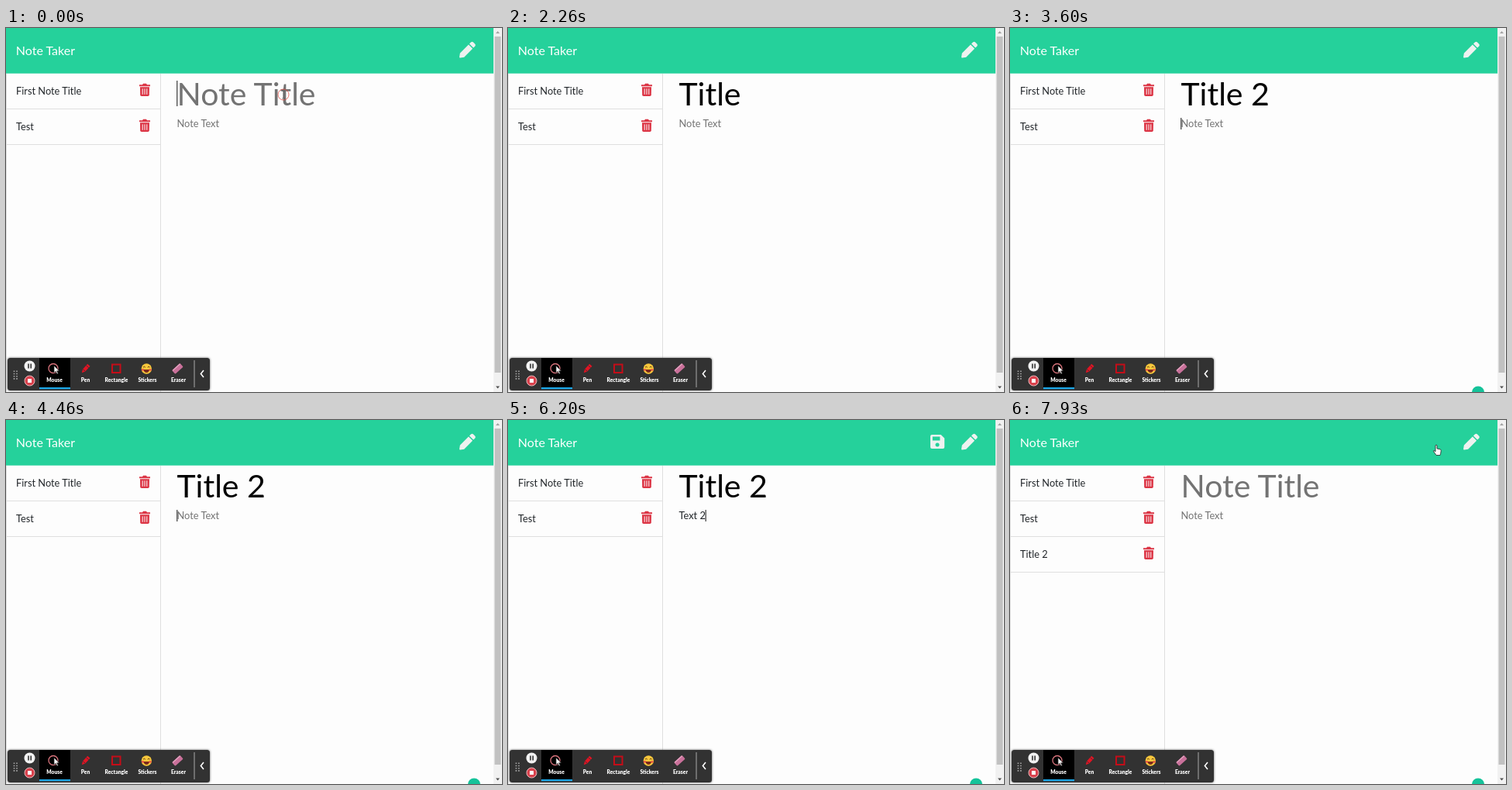
These frames come from a looping animation (640x470 px, 8 s). An HTML page:

```html
<!DOCTYPE html>
<html lang="en">
<head>
<meta charset="utf-8">
<title>Note Taker</title>
<style>
  html, body { margin: 0; width: 100%; height: 100%; overflow: hidden; background: #fdfdfd; }
  svg { display: block; width: 640px; height: 470px; }
  text { font: 12.8px Lato, sans-serif; white-space: pre; fill: #212529; }
  #title { font-size: 41px; }
  .brand { font-size: 16px; fill: #fff; }
  #labels text { font-size: 6.7px; font-weight: 900; fill: #fff; text-anchor: middle; }
  .line { stroke: #dfdfdf; fill: none; }
  .icon { fill: #eef2f0; fill-rule: evenodd; }
  .pointer { fill: #fff; stroke: #222; stroke-width: .8; stroke-linejoin: round; }
</style>
</head>
<body>
<svg viewBox="0 0 640 470">
  <defs>
    <filter id="shadow" x="-10%" y="-30%" width="120%" height="160%">
      <feDropShadow dx="0" dy="0" stdDeviation="1.8" flood-opacity=".6"/>
    </filter>
    <g id="trash" fill="#dc3545">
      <path d="M172 73.2h4l1-1.5h4l1 1.5h4v2h-14z"/>
      <path d="M173 76.3h12l-.2 10q-.1 1.7-1.6 1.7h-8.4q-1.5 0-1.6-1.7z"/>
      <path d="M176.2 78.3v7.5M179 78.3v7.5M181.8 78.3v7.5" stroke="#fdfdfd"/>
    </g>
    <path id="arrow" class="pointer" d="M0 0v10.2l2.4-2.2 1.8 3.8 1.6-.8-1.8-3.6h3.2z"/>
  </defs>

  <rect width="629" height="58.7" fill="#25d19b"/>
  <text class="brand" x="12.8" y="34.6">Note Taker</text>
  <path id="save" class="icon" d="M547 19h11.6l4.6 4.6V35q0 2-2 2h-14.2q-2 0-2-2V21q0-2 2-2zM547.8 21.6v5h9.6v-5zM554 29.4a2.6 2.6 0 1 0 .01 0z"/>
  <path class="icon" transform="translate(585 17.7) scale(1.04)" d="M19.5 5.5l-1.8 1.8q-.3.3-.6 0l-4.4-4.4q-.3-.3 0-.6l1.8-1.8q1.3-1.1 2.6 0l2.4 2.4q1.1 1.3 0 2.6zM11.1 3.9L.8 14.2 0 19q0 1.1 1.1 1l4.8-.8L16.1 8.9q.3-.3 0-.6L11.7 3.9q-.3-.3-.6 0z"/>

  <path class="line" d="M.5 59V470M199.5 59V470"/>
  <g id="list"></g>
  <text id="title" x="220.5" y="99.7"></text>
  <text id="body" x="220.5" y="128"></text>
  <rect id="caret" width="1" fill="#111"/>
  <circle id="badge" cx="604" cy="470.5" r="8" fill="#15c39a"/>

  <rect x="629" width="11" height="470" fill="#f1f1f1"/>
  <rect x="630.5" y="11" width="8" height="434" fill="#c1c1c1"/>
  <path d="M632 7l2.5-3 2.5 3z" fill="#a3a3a3"/>
  <path d="M632 462.5l2.5 3 2.5-3z" fill="#505050"/>

  <rect x="2" y="426" width="261" height="42" rx="3.5" fill="#333" filter="url(#shadow)"/>
  <rect x="43" y="426" width="40" height="40" fill="#000"/>
  <rect x="43" y="464" width="40" height="2.2" fill="#1aa7e8"/>
  <path d="M10.5 442.5v12M14 442.5v12" stroke="#aaa" stroke-width="1.6" stroke-dasharray="1.6 1.6"/>
  <circle cx="30.5" cy="436.5" r="7" fill="#f2f2f2"/>
  <path d="M29 433.6v5.8M32.2 433.6v5.8" stroke="#333" stroke-width="1.6"/>
  <circle cx="30.5" cy="455.5" r="6.5" fill="#d9424d" stroke="#e8b9bc"/>
  <rect x="28" y="453" width="5" height="5" rx=".5" fill="#fff"/>

  <circle cx="61" cy="439.5" r="6" fill="none" stroke="#d9737c" stroke-width="1.3"/>
  <use href="#arrow" transform="translate(62 436) scale(.92)"/>
  <g transform="translate(102.5 440) rotate(42)" fill="#e01424">
    <path d="M-2.2-6.5h4.4v9.3L0 7l-2.2-4.2z"/>
    <path d="M-2.2-3.8h4.4M-2.2 2.6h4.4" stroke="#333" stroke-width=".8"/>
  </g>
  <rect x="137" y="434.5" width="10.5" height="10.5" fill="none" stroke="#c50d18" stroke-width="2"/>
  <circle cx="181.3" cy="440" r="6.7" fill="#f8c83c"/>
  <path d="M177 438.2q1.4-2 2.8 0M182.8 438.2q1.4-2 2.8 0" fill="none" stroke="#5b3612"/>
  <path d="M177.5 441h7.6q-.6 4-3.8 4t-3.8-4z" fill="#7b2a1c"/>
  <path d="M175 441.4h3M184.5 441.4h3" stroke="#ea4f45" stroke-width="2.2"/>
  <g transform="translate(221.3 439.7) rotate(-42)">
    <rect x="-7" y="-3" width="14" height="6.4" rx="1.2" fill="#c9709a"/>
    <path d="M-6.4-2.2H6.4" stroke="#e6a9c4" stroke-width="1.2"/>
  </g>
  <g id="labels"></g>
  <path d="M243 429v35" stroke="#aaa"/>
  <path d="M255 442l-3.6 4.5 3.6 4.5" fill="none" stroke="#fff" stroke-width="1.6"/>

  <circle id="ring" fill="none" stroke="#e0483f"/>
  <g id="mouse">
    <path id="ibeam" d="M-2-5h1.5L0-4.5.5-5H2M0-4.5v9M-2 5h1.5L0 4.5.5 5H2" fill="none" stroke="#555" stroke-width=".7"/>
    <use id="pointer" href="#arrow"/>
    <path id="hand" class="pointer" d="M-1 .8Q0-.8 1 .8V5l4 .8q1.3.4 1.2 1.7l-.5 3.7-.7 2.3H0L-3.2 9q-1-1.6.2-1.7l2 1.4z"/>
  </g>
</svg>
<script>
const LOOP = 8000, BLINK = 530, TAB = 3330, CLICK = 7480, SAVED = 7600;
const LEFT = 220.5;
const $ = id => document.getElementById(id);
const show = (id, on) => $(id).setAttribute("visibility", on ? "visible" : "hidden");
const set = (id, attrs) => {
  for (const k in attrs) $(id).setAttribute(k, attrs[k]);
};

// key press times, one per character
const titleKeys = [1060, 1130, 1230, 1330, 1460, 2530, 2720];
const bodyKeys = [4550, 4730, 4900, 5060, 5680, 5860];
const path = [[6480, 358, 86], [6930, 583, 43], [7270, 550, 32]];

$("list").innerHTML = ["First Note Title", "Test", "Title 2"].map((name, i) =>
  `<g id="item${i}" transform="translate(0 ${i * 46})">
    <text x="13" y="86">${name}</text><use href="#trash"/>
    <path class="line" d="M1 104.5H199"/></g>`).join("");
$("labels").innerHTML = ["Mouse", "Pen", "Rectangle", "Stickers", "Eraser"].map((name, i) =>
  `<text x="${62.5 + i * 40}" y="457.3">${name}</text>`).join("");

function field(id, text, keys, hint, t) {
  const count = t < SAVED ? keys.filter(k => k <= t).length : 0;
  $(id).textContent = count ? text.slice(0, count) : hint;
  $(id).style.fill = count ? (id == "title" ? "#000" : "#212529") : "#737373";
  return count;
}

function drawCaret(t, counts) {
  const inBody = t >= TAB, id = inBody ? "body" : "title";
  const last = Math.max(-70, ...[...titleKeys, TAB, ...bodyKeys].filter(k => k <= t));
  const count = counts[+inBody];
  const width = count ? $(id).getSubStringLength(0, count) : 0;
  set("caret", { x: LEFT + width - .2, y: inBody ? 116 : 68, height: inBody ? 15 : 33 });
  show("caret", t < CLICK && Math.floor((t - last) / BLINK) % 2 == 0);
}

function mouseAt(t) {
  if (t <= path[0][0]) return path[0].slice(1);
  for (let i = 1; i < path.length; i++) {
    const [t0, x0, y0] = path[i - 1], [t1, x1, y1] = path[i];
    if (t < t1) {
      const p = (t - t0) / (t1 - t0), e = p * p * (3 - 2 * p);
      return [x0 + (x1 - x0) * e, y0 + (y1 - y0) * e];
    }
  }
  return path.at(-1).slice(1);
}

function drawMouse(t) {
  const [x, y] = mouseAt(t);
  const visible = t < titleKeys[0] || t >= path[0][0];
  const overSave = x < 564 && y < 38;
  set("mouse", { transform: `translate(${x} ${y})` });
  show("ibeam", visible && y > 59);
  show("hand", visible && overSave);
  show("pointer", visible && y <= 59 && !overSave);

  const age = t >= CLICK ? t - CLICK : t;
  set("ring", { cx: x, cy: y, r: 7 + age / 130, opacity: .75 * (1 - age / 260) });
  show("ring", age < 260);
}

const start = performance.now();
function draw(now) {
  const t = Math.max(0, now - start) % LOOP;
  const counts = [
    field("title", "Title 2", titleKeys, "Note Title", t),
    field("body", "Text 2", bodyKeys, "Note Text", t)
  ];
  drawCaret(t, counts);
  drawMouse(t);
  show("save", counts[0] && counts[1]);
  show("item2", t >= SAVED);
  show("badge", t >= TAB);
  requestAnimationFrame(draw);
}
draw(start);
</script>
</body>
</html>
```
